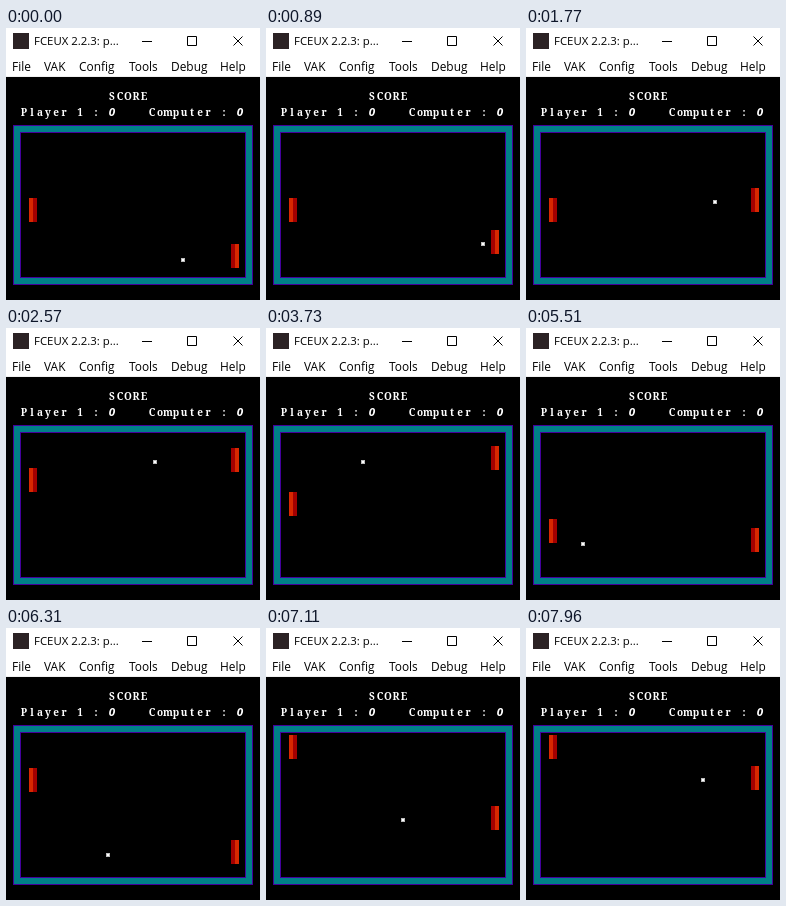
Animation of 254x272 px, one loop 7.99 s. Source, as an HTML page:

```html
<!DOCTYPE html>
<html lang="en">
<head>
<meta charset="utf-8">
<title>Paddle game</title>
<style>
  html, body { margin: 0; width: 100%; height: 100%; overflow: hidden; background: #000; }
  svg { display: block; width: 254px; height: 272px; }
  .ui { font: 11.9px "Open Sans", "Noto Sans", sans-serif; fill: #000; }
  .title { font-size: 11.4px; }
  .score { font: bold 10px "Noto Serif", "DejaVu Sans", serif; fill: #fff; text-anchor: middle; }
  .zero { font: italic bold 9.6px "DejaVu Sans", sans-serif; }
  .buttons { fill: none; stroke: #000; }
  rect { shape-rendering: crispEdges; }
</style>
</head>
<body>
<svg viewBox="0 0 254 272">
  <rect width="254" height="272"/>
  <rect width="254" height="49" fill="#f0f0f0"/>
  <rect width="254" height="48" fill="#fff"/>
  <rect x="7" y="5" width="16" height="16" fill="#2b2224"/>
  <g class="ui" id="labels"></g>
  <g class="buttons">
    <path d="M136 13.5h10M181.5 8.5h9v9h-9z"/>
    <path d="M227.5 8.5l9 9M236.5 8.5l-9 9"/>
  </g>
  <g class="score" id="scores"></g>
  <rect x="7" y="97" width="240" height="160" fill="#44009c"/>
  <rect x="8" y="98" width="238" height="158" fill="#008088"/>
  <rect x="14" y="104" width="226" height="146" fill="#44009c"/>
  <rect x="15" y="105" width="224" height="144"/>
  <g id="player">
    <rect width="8" height="24" fill="#a40000"/>
    <rect width="4" height="24" fill="#d82800"/>
  </g>
  <g id="computer">
    <rect width="8" height="24" fill="#a40000"/>
    <rect x="4" width="4" height="24" fill="#d82800"/>
  </g>
  <g id="ball">
    <rect x="-2" y="-2" width="4" height="4" fill="#bcbcbc"/>
    <rect x="-1" y="-1" width="2" height="2" fill="#fff"/>
  </g>
</svg>
<script>
const LOOP = 7990;
const WALL = { left: 36, right: 224, top: 108, bottom: 244 };
const BALL_START = { x: 177, y: 232 };
const PLAYER_START = 170;
const PLAYER_SPEED = 0.094; // px per ms

// The game's pace varies a little: [time, distance travelled along each axis].
const pace = [
  [0, 0], [200, 5], [890, 40], [2570, 122],
  [3730, 174], [5510, 256], [6310, 301], [LOOP, 378]
];
// Key presses: [time, where the player's paddle heads].
const presses = [[2251, 107], [3124, 176], [4995, 191], [5770, 107]];

const $ = id => document.getElementById(id);
const clamp = (value, low, high) => Math.min(high, Math.max(low, value));

// The screen refreshes about every 48 ms.
function travelled(t) {
  const i = pace.findIndex(([time]) => time > t);
  const [[t0, d0], [t1, d1]] = [pace[i - 1], pace[i]];
  const steps = Math.round((t1 - t0) / 48);
  const step = Math.floor((t - t0) / (t1 - t0) * steps);
  return Math.round(d0 + (d1 - d0) * step / steps);
}

// Reflects a straight run between two walls.
function bounce(distance, low, high) {
  const span = high - low;
  const phase = distance % (2 * span);
  return phase < span
    ? { at: low + phase, dir: 1 }
    : { at: high - (phase - span), dir: -1 };
}

function playerTop(t) {
  let top = PLAYER_START;
  presses.forEach(([time, goal], i) => {
    const end = Math.min(t, i + 1 < presses.length ? presses[i + 1][0] : LOOP);
    const reach = Math.max(0, end - time) * PLAYER_SPEED;
    top += clamp(goal - top, -reach, reach);
  });
  return Math.round(top);
}

// The computer follows the ball in steps of two pixels.
function computerTop(ball) {
  const goal = ball.at - 15 - ball.dir;
  return clamp(goal - goal % 2, 106, 224);
}

function addText(parent, string, x, y, className = "") {
  const text = document.createElementNS("http://www.w3.org/2000/svg", "text");
  text.setAttribute("x", x);
  text.setAttribute("y", y);
  text.setAttribute("class", className);
  text.textContent = string;
  $(parent).append(text);
}

// Centres every character in an 8 px cell.
function addCells(string, x, y, className) {
  const centres = [...string].map((_, i) => x + 4 + 8 * i);
  addText("scores", string, centres.join(" "), y, className);
}

function place(id, x, y) {
  $(id).setAttribute("transform", `translate(${x} ${y})`);
}

function render(t) {
  const distance = travelled(t);
  const x = bounce(distance + BALL_START.x - WALL.left, WALL.left, WALL.right);
  const y = bounce(distance + BALL_START.y - WALL.top, WALL.top, WALL.bottom);
  place("ball", x.at, y.at);
  place("player", 23, playerTop(t));
  place("computer", 225, computerTop(y));
}

addText("labels", "FCEUX 2.2.3: p...", 28, 17, "title");
[["File", 6], ["VAK", 38], ["Config", 73], ["Tools", 123], ["Debug", 165], ["Help", 214]]
  .forEach(([name, x]) => addText("labels", name, x, 43));
addCells("SCORE", 102, 72);
[["Player 1 :", 14], ["Computer :", 142]].forEach(([name, x]) => {
  addCells(name, x, 88);
  addCells("0", x + 88, 88, "zero");
});

const start = performance.now();
function tick() {
  render((performance.now() - start) % LOOP);
  requestAnimationFrame(tick);
}
render(0);
requestAnimationFrame(tick);
</script>
</body>
</html>
```
